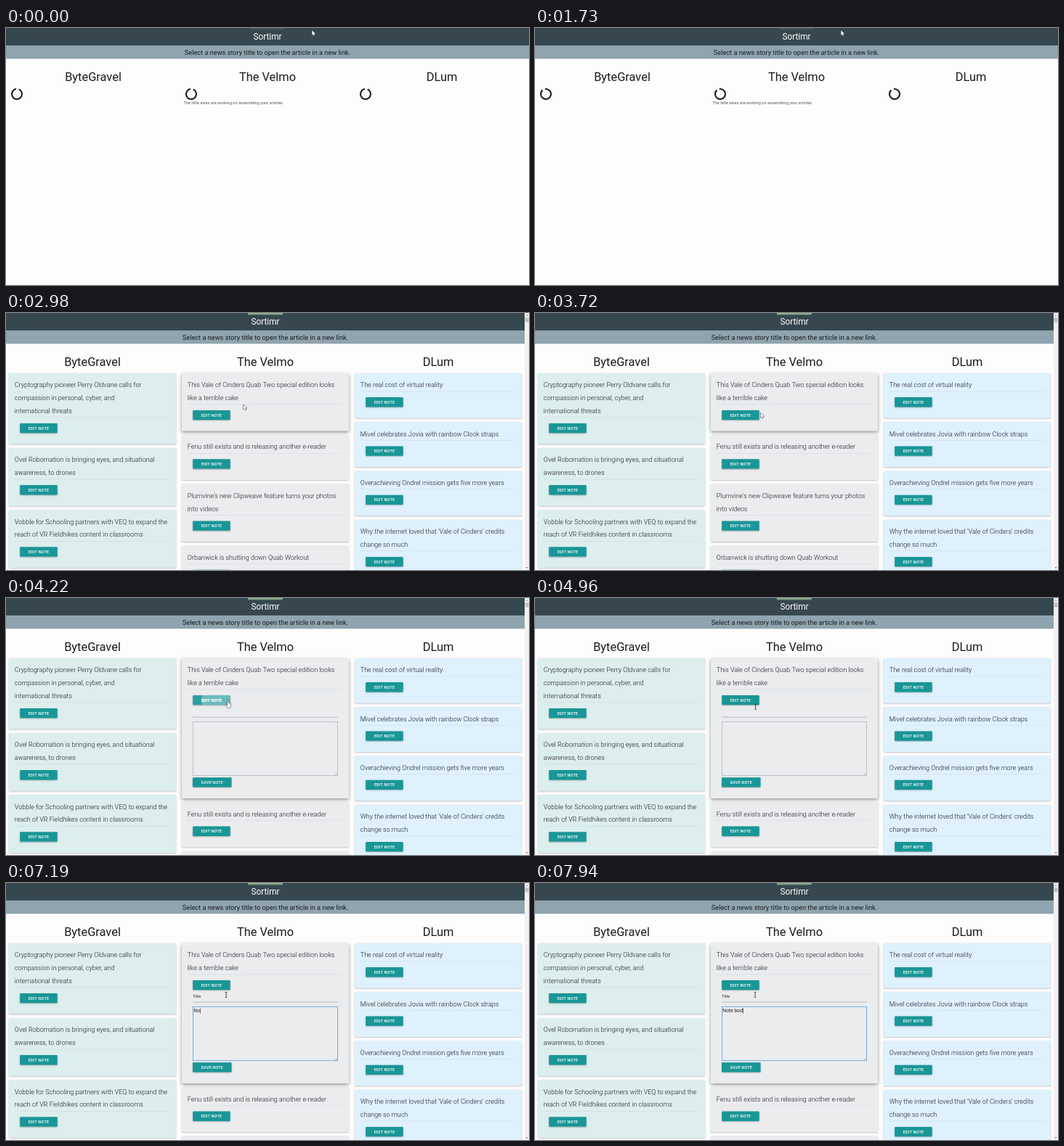
These frames come from a looping animation (720 px wide and 354 px high, 8000 ms). An HTML page with a canvas:

```html
<!DOCTYPE html>
<html lang="en">
<head>
<meta charset="utf-8">
<title>News columns</title>
<style>
  html, body { margin: 0; width: 100%; height: 100%; overflow: hidden; background: #fefdfe; }
  canvas { display: block; width: 720px; height: 354px; }
</style>
</head>
<body>
<canvas id="stage"></canvas>
<script>
const W = 720, H = 354, LOOP = 8000, STEP = 248.1;
const canvas = document.getElementById('stage');
const ctx = canvas.getContext('2d');
const dpr = window.devicePixelRatio || 1;
canvas.width = W * dpr;
canvas.height = H * dpr;

const TEAL = '#199697', INK = '#1a1c1f';
const LINE = 17.9, CARD_W = 230, GAP = 5.6;
const FORM_H = 113.3;

// Moments, counted in steps
const AT = { spin: 3, cards: 8, titles: 9, tab: 10, hover: 12, press: 16, form: 17,
             leave: 20, title: 21, body: 27 };

const columns = [
  { name: 'ByteGravel', x: 4, fill: '#dceeee', cards: [
    ['Cryptography pioneer Perry Oldvane calls for', 'compassion in personal, cyber, and', 'international threats'],
    ['Ovel Robomation is bringing eyes, and situational', 'awareness, to drones'],
    ['Vobble for Schooling partners with VEQ to expand the', 'reach of VR Fieldhikes content in classrooms']
  ] },
  { name: 'The Velmo', x: 242, fill: '#ebecee', cards: [
    ['This Vale of Cinders Quab Two special edition looks', 'like a terrible cake'],
    ['Fenu still exists and is releasing another e-reader'],
    ["Plumvine's new Clipweave feature turns your photos", 'into videos'],
    ['Orbanwick is shutting down Quab Workout']
  ] },
  { name: 'DLum', x: 480, fill: '#def1fd', cards: [
    ['The real cost of virtual reality'],
    ['Mivel celebrates Jovia with rainbow Clock straps'],
    ['Overachieving Ondrel mission gets five more years'],
    ["Why the internet loved that 'Vale of Cinders' credits", 'change so much']
  ] }
];

const path = [[0, 421.3, 3.2], [9, 421.3, 3.2], [12, 327, 126], [16, 305, 141], [18, 305, 141], [21, 303, 154]];

function text(str, x, y, size, color = INK, weight = 400, align = 'left', spacing = 0) {
  ctx.font = `${weight} ${size}px Roboto, "Open Sans", sans-serif`;
  ctx.letterSpacing = spacing + 'px';
  ctx.textAlign = align;
  ctx.fillStyle = color;
  ctx.fillText(str, x, y);
  ctx.letterSpacing = '0px';
}

function rect(x, y, w, h, color) {
  ctx.fillStyle = color;
  ctx.fillRect(x, y, w, h);
}

function shape(points, fill, stroke, width = 0.7) {
  ctx.beginPath();
  points.forEach(([x, y]) => ctx.lineTo(x, y));
  ctx.closePath();
  if (stroke) { ctx.strokeStyle = stroke; ctx.lineWidth = width; ctx.lineJoin = 'round'; ctx.stroke(); }
  ctx.fillStyle = fill;
  ctx.fill();
}

// Rounded box with a drop shadow
function panel(x, y, w, h, fill, drop, blur, alpha) {
  ctx.save();
  ctx.shadowColor = `rgba(0,0,0,${alpha})`;
  ctx.shadowOffsetY = drop * dpr;
  ctx.shadowBlur = blur * dpr;
  ctx.fillStyle = fill;
  ctx.beginPath();
  ctx.roundRect(x, y, w, h, 0.9);
  ctx.fill();
  ctx.restore();
}

function button(label, x, y, w) {
  panel(x, y, w, 13.3, TEAL, 0.8, 2, 0.3);
  text(label, x + w / 2, y + 8.7, 5.6, '#fff', 500, 'center', 0.15);
}

function ripple(k, x, y) {
  ctx.save();
  ctx.beginPath();
  ctx.roundRect(x, y, 51.5, 13.3, 0.9);
  ctx.clip();
  ctx.fillStyle = 'rgba(255,255,255,0.08)';
  ctx.fill();
  if (k >= AT.form) {
    const age = k - AT.form;
    ctx.beginPath();
    ctx.arc(306, 142, 37 + age * 25, 0, Math.PI * 2);
    ctx.fillStyle = `rgba(255,255,255,${Math.max(0, 0.3 - age * 0.1)})`;
    ctx.fill();
    text('EDIT NOTE', x + 25.75, y + 8.7, 5.6, '#fff', 500, 'center', 0.15);
  }
  ctx.restore();
}

function header(k, width) {
  const mid = width / 2;
  rect(0, 24, width, 18.4, '#8fa4ae');
  rect(0, 0, width, 24, '#36474f');
  if (k < AT.tab) {
    rect(mid - 24, 0, 48, 2, '#46565e');
  } else {
    rect(mid - 24, 0, 48, 1.8, '#8fb592');
    for (let x = mid - 24; x < mid + 24; x += 2) rect(x, 1.8, 1, 1, '#8fb592');
  }
  text('Sortimr', mid, 16.3, 11.85, '#fff', 400, 'center');
  text('Select a news story title to open the article in a new link.', mid, 36.7, 9.22, INK, 400, 'center');
  columns.forEach((col, i) => text(col.name, width * (2 * i + 1) / 6, 72.6, 16.4, INK, 400, 'center'));
}

function spinner(x, y, angle) {
  const top = angle - Math.PI / 2, gap = 0.27;
  ctx.beginPath();
  ctx.arc(x, y, 7, top + gap, top + Math.PI * 2 - gap);
  ctx.lineWidth = 2.1;
  ctx.strokeStyle = '#202124';
  ctx.stroke();
}

function loading(k) {
  const turns = Math.max(0, k - AT.spin + 1);
  for (const x of [15, 255, 495]) spinner(x, 91, (8 + turns * 65.5) * Math.PI / 180);
  text('The little elves are working on assembling your articles', 244.4, 105.4, 5.63, '#4c5a52');
}

function typed(str, x, y, size, focused) {
  text(str, x, y, size, '#222');
  if (focused) rect(x + ctx.measureText(str).width + 0.3, y - size * 0.9, 0.6, size * 1.1, '#222');
}

function form(k) {
  const inTitle = k >= AT.title && k < AT.body, inBody = k >= AT.body;
  const title = 'Title'.slice(0, [0, 1, 2, 4, 5][Math.max(0, Math.min(k - AT.title, 4))]);
  const body = 'Note body'.slice(0, Math.max(0, k - 28) * 2);
  rect(257, 163.8, 199.5, inTitle ? 0.9 : 0.5, inTitle ? '#26a69a' : '#85888b');
  typed(title, 257.3, 157.7, 5.65, inTitle);
  ctx.lineWidth = inBody ? 0.8 : 0.6;
  ctx.strokeStyle = inBody ? '#5c9bd8' : '#a2a4a8';
  ctx.strokeRect(257.4, 170.3, 199, 74.4);
  typed(body, 258.3, 178.4, 6.8, inBody);
  ctx.lineWidth = 0.4;
  ctx.strokeStyle = '#777';
  ctx.beginPath();
  for (const d of [1.5, 3]) {
    ctx.moveTo(455.8 - d, 244);
    ctx.lineTo(455.8, 244 - d);
  }
  ctx.stroke();
  button('SAVE NOTE', 257, 247.2, 53.5);
}

function board(k) {
  columns.forEach((col, c) => {
    let y = 83;
    col.cards.forEach((lines, i) => {
      const first = c === 1 && i === 0, extra = (lines.length - 1) * LINE;
      const open = first && k >= AT.form;
      const h = 61.7 + extra + (open ? FORM_H : 0);
      if (first && k >= AT.hover) panel(col.x, y, CARD_W, h, col.fill, 2, 5, 0.42);
      else panel(col.x, y, CARD_W, h, col.fill, 0.8, 2.2, 0.28);
      rect(col.x + 8, y + 24.8 + extra, CARD_W - 16, 0.5, 'rgba(120,140,150,0.22)');
      if (k >= AT.titles) {
        lines.forEach((line, n) => text(line, col.x + 7.8, y + 19.2 + n * LINE, 9, INK, 300));
      }
      button('EDIT NOTE', col.x + 15.2, y + 33.1 + extra, 51.5);
      if (first && k >= AT.press && k < AT.leave) ripple(k, col.x + 15.2, y + 33.1 + extra);
      if (open) form(k);
      y += h + GAP;
    });
  });
}

function scrollbar() {
  rect(714, 0, 6, H, '#f1f1f1');
  rect(714.6, 6.3, 4.8, 6.4, '#c1c1c1');
  shape([[715.6, 3.8], [718.4, 3.8], [717, 2.2]], '#777');
  shape([[715.6, 350.2], [718.4, 350.2], [717, 351.8]], '#555');
}

function cursor(k) {
  let i = 0;
  while (i < path.length - 2 && k >= path[i + 1][0]) i++;
  const [k0, x0, y0] = path[i], [k1, x1, y1] = path[i + 1];
  const p = Math.min(1, (k - k0) / (k1 - k0));
  ctx.save();
  ctx.translate(x0 + (x1 - x0) * p, y0 + (y1 - y0) * p);
  if (k < AT.press) {
    shape([[0, 0], [0, 6.7], [1.5, 5.4], [2.5, 7.9], [3.6, 7.4], [2.6, 5], [4.7, 4.9]], '#fff', '#222', 1);
  } else if (k < AT.leave) {
    shape([[0, 0], [1.1, 0], [1.1, 3.6], [4.2, 4.4], [4.5, 7], [3.6, 10], [0.2, 10],
           [-2, 6.5], [-1.5, 5.6], [0, 7]], '#fff', '#222', 1);
  } else {
    rect(-0.35, -3.5, 0.8, 7, '#222');
    rect(-1.5, -3.7, 3, 0.6, '#222');
    rect(-1.5, 3.2, 3, 0.6, '#222');
  }
  ctx.restore();
}

function draw(t) {
  const k = Math.floor((t + 8) / STEP);
  const loaded = k >= AT.cards;
  ctx.setTransform(dpr, 0, 0, dpr, 0, 0);
  rect(0, 0, W, H, '#fefdfe');
  header(k, loaded ? 714 : W);
  if (loaded) {
    board(k);
    scrollbar();
  } else {
    loading(k);
  }
  cursor(k);
}

const start = performance.now();
function tick() {
  draw((performance.now() - start) % LOOP);
  requestAnimationFrame(tick);
}
tick();
</script>
</body>
</html>
```
